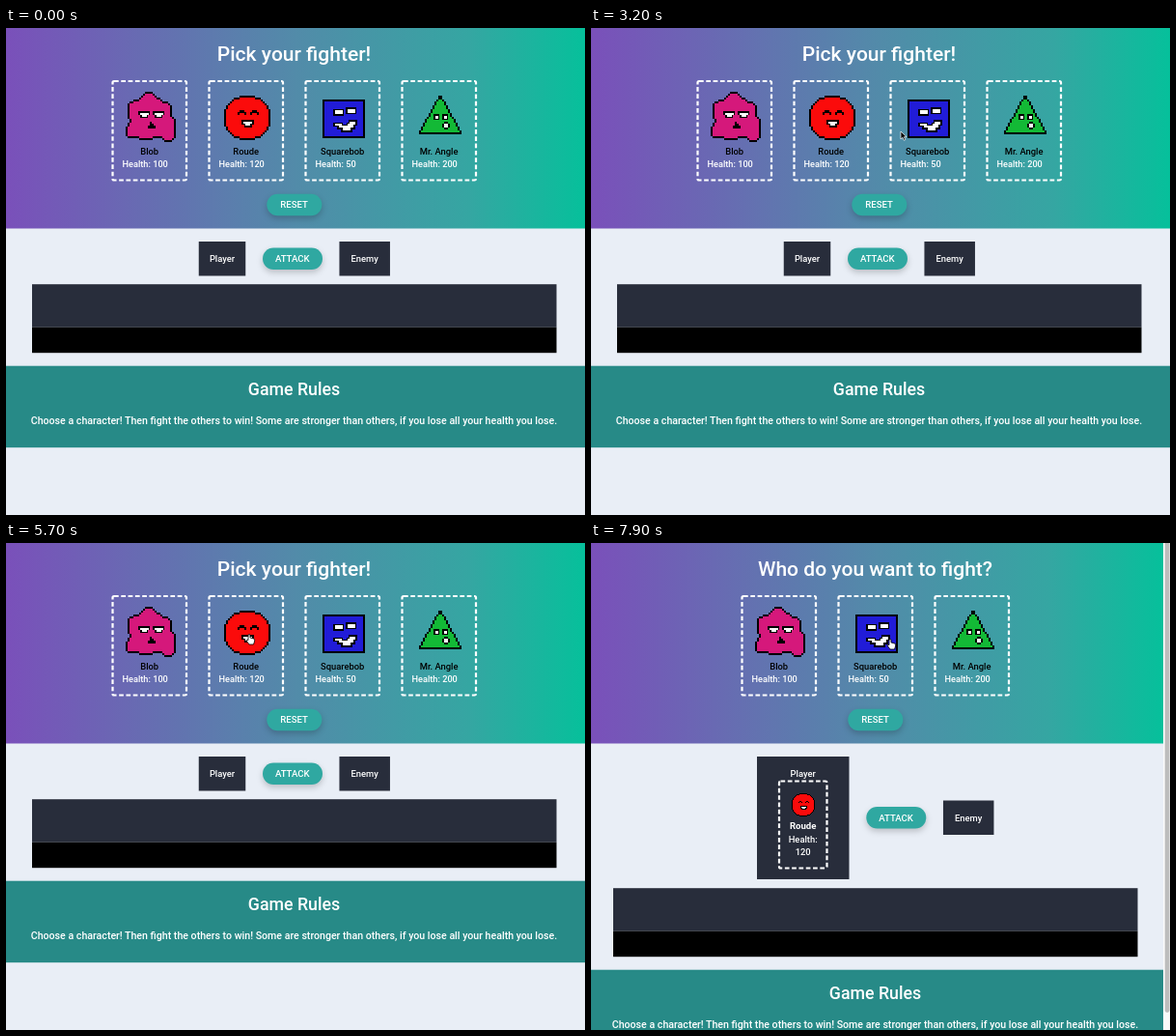
An HTML page for the animation above (8 s loop, 600 by 504 pixels).

```html
<!DOCTYPE html>
<html lang="en">
<head>
<meta charset="utf-8">
<title>Pick your fighter</title>
<style>
html, body { margin: 0; width: 100%; height: 100%; overflow: hidden; background: #e9eef6; }
svg { display: block; width: 600px; height: 504px; }
text { font-family: Roboto, "Liberation Sans", sans-serif; font-weight: 500; fill: #fff; }
.art { shape-rendering: crispEdges; }
.button { filter: drop-shadow(0 3px 3px #0003); }
</style>
</head>
<body>
<svg id="stage" viewBox="0 0 600 504"></svg>
<script>
const LOOP = 8000, SWITCH = 5800, CELL = 2;
const DARK = '#282d3b';

const rect = (x, y, w, h, fill, extra = '') =>
  `<rect x="${x}" y="${y}" width="${w}" height="${h}" fill="${fill}" ${extra}/>`;
const text = (x, y, s, size = 9.4, extra = '') =>
  `<text x="${x}" y="${y}" font-size="${size}" text-anchor="middle" ${extra}>${s}</text>`;
const path = (d, fill, extra = '') => `<path d="${d}" fill="${fill}" ${extra}/>`;

// Shapes are tested on a coarse grid; x is relative to the card centre.
function inPolygon(points) {
  return (x, y) => points.reduce((inside, [ax, ay], i) => {
    const [bx, by] = points[(i + 1) % points.length];
    return (ay > y) !== (by > y) && x < (bx - ax) * (y - ay) / (by - ay) + ax ? !inside : inside;
  }, false);
}

function pixelArt(inside, color, details) {
  let body = '', edge = '';
  for (let y = 66; y < 120; y += CELL) {
    for (let x = -28; x < 28; x += CELL) {
      const hit = (dx, dy) => inside(x + 1 + dx * CELL, y + 1 + dy * CELL);
      if (!hit(0, 0)) continue;
      const cell = `M${x} ${y}h2v2h-2z`;
      if (hit(1, 0) && hit(-1, 0) && hit(0, 1) && hit(0, -1)) body += cell;
      else edge += cell;
    }
  }
  return `<g class="art">${path(body, color)}${path(edge, '#000')}${details}</g>`;
}

const blob = [[-9, 70], [-4, 66], [2, 66], [8, 72], [13, 76], [19, 77], [22, 82], [22, 90],
  [26, 94], [26, 113], [22, 118], [16, 118], [10, 114], [2, 115], [-2, 117], [-8, 117],
  [-12, 115], [-22, 115], [-26, 111], [-26, 103], [-22, 96], [-25, 90], [-24, 79], [-18, 75], [-12, 74]];

const fighters = {
  blob: {
    name: 'Blob', health: 100,
    art: pixelArt(inPolygon(blob), '#d5187b',
      path('M-13 86h12v4h-2v3h-8v-3h-2zM2 86h12v4h-2v3h-8v-3h-2z', '#000') +
      path('M-11 88h9v2h-2v2h-5v-2h-2zM4 88h9v2h-2v2h-5v-2h-2z', '#fff') +
      path('M-1 97h2v2h2v2h2v3h-8v-3h2z', '#000'))
  },
  roude: {
    name: 'Roude', health: 120,
    art: pixelArt((x, y) => (x / 25) ** 2 + ((y - 93) / 23.5) ** 2 < 1, '#fb0b0b',
      path('M-10 87h2v-2h5v2h2v3h-2v-2h-5v2h-2zM3 87h2v-2h5v2h2v3h-2v-2h-5v2h-2z', '#000') +
      path('M-6 95h13v5h-2v3h-8v-3h-3z', '#000') +
      path('M-4 97h9v2h-2v2h-5v-2h-2z', '#fff'))
  },
  square: {
    name: 'Squarebob', health: 50,
    art: pixelArt((x, y) => Math.abs(x) < 22 && y > 74 && y < 114, '#211cd7',
      path('M-11 84h11v7h-11zM2 82h11v7h-11z', '#000') +
      path('M-9 85h8v4h-8zM4 84h8v4h-8z', '#fff') +
      path('M-11 98h10v2h4v-2h2v-3h9v6h-2v4h-3v3h-12v-3h-4v-3h-4z', '#000') +
      path('M-9 99h7v2h6v-2h2v-2h6v3h-2v3h-3v3h-8v-3h-4v-2h-4z', '#fff'))
  },
  angle: {
    name: 'Mr. Angle', health: 200,
    art: pixelArt(inPolygon([[0, 68], [23.5, 110], [-23.5, 110]]), '#13b936',
      path('M-7 89h6v6h-6zM2 89h6v6h-6zM4 97h4v2h2v4h-2v2h-4v-2h-2v-4h2z', '#000') +
      path('M-5 91h3v3h-3zM4 91h3v3h-3zM4 99h4v4h-4z', '#fff'))
  }
};

const dashed = (x, y, w, h) =>
  rect(x, y, w, h, 'none', 'rx="1.5" stroke="#fff" stroke-width="2.2" stroke-dasharray="4.7 2.6"');

const card = ({ name, health, art }, x) =>
  dashed(x - 38.5, 55, 76.5, 102.5) +
  `<g transform="translate(${x + 1})">${art}</g>` +
  text(x - .3, 131, name, 9.4, 'style="fill:#000"') +
  text(x - 28.5, 144.3, `Health: ${health}`, 9.2, 'style="text-anchor:start"');

const button = (x, y, w, label) =>
  rect(x - w / 2, y, w, 22.5, '#2fa8a1', 'rx="11.2" class="button"') +
  text(x - .3, y + 14.7, label, 9.6);

const label = (x, y, w, s) => rect(x - w / 2, y, w, 35.5, DARK) + text(x, y + 21.2, s);

const header = (width, mid, title, cards) =>
  rect(0, 0, width, 207.5, 'url(#sky)') +
  text(mid, 34, title, 21) + cards +
  button(mid + .3, 171.7, 57, 'RESET');

const footer = (width, mid, y) =>
  rect(mid - 271.5, y, 543.5, 44.5, DARK) +
  rect(mid - 271.5, y + 44.5, 543.5, 26.5, '#000') +
  rect(0, y + 84.5, width, 84.5, '#278a87') +
  text(mid, y + 115, 'Game Rules', 17.8) +
  text(mid, y + 145.2, 'Choose a character! Then fight the others to win! Some are stronger than others, ' +
    'if you lose all your health you lose.', 10.62);

const { blob: b, roude: r, square: s, angle: a } = fighters;

const pickScene =
  header(600, 298.5, 'Pick your fighter!', [b, r, s, a].map((f, i) => card(f, 149 + 100 * i)).join('')) +
  label(224, 221, 48.5, 'Player') + button(297, 227.5, 62, 'ATTACK') + label(371.7, 221, 52.5, 'Enemy') +
  footer(600, 298.5, 265.2);

const fightScene =
  header(593, 294.5, 'Who do you want to fight?', [b, s, a].map((f, i) => card(f, 195 + 100 * i)).join('')) +
  rect(172, 221, 95.5, 127, DARK) + text(219.7, 242.2, 'Player') +
  dashed(195, 246.5, 49.5, 90) +
  `<g transform="translate(220 271) scale(.52) translate(0 -93)">${r.art}</g>` +
  text(219.7, 296.3, 'Roude', 9.6, 'style="font-weight:700"') +
  text(219.7, 309.8, 'Health:') + text(219.7, 323, '120') +
  button(316.3, 273, 62, 'ATTACK') + label(391.2, 266.5, 52.5, 'Enemy') +
  footer(593, 294.5, 357.2) +
  rect(593, 0, 7, 504, '#fafafa') + rect(594.7, -5, 4.8, 491, '#bdbdbd', 'rx="2.4"');

const arrow = path('M0 0v8l1.9-1.7 1.4 3 1.5-.7-1.4-2.9h2.6z', '#000', 'stroke="#fff" stroke-width=".7"');
const hand = path('M0 0q1-1 2 0v3l4 1q1 1 .5 3l-1 3h-4.5l-3-4q0-1.500 2-.5z', '#fff', 'stroke="#000" stroke-width=".8"');

const stage = document.getElementById('stage');
stage.innerHTML = `
  <linearGradient id="sky">
    <stop stop-color="#7a50ba"/>
    <stop offset=".5" stop-color="#528ba9"/>
    <stop offset=".8" stop-color="#35a6a2"/>
    <stop offset="1" stop-color="#06c09b"/>
  </linearGradient>
  <g id="pick">${pickScene}</g><g id="fight">${fightScene}</g>
  <g id="cursor"><g id="arrow">${arrow}</g><g id="hand">${hand}</g></g>`;

// Pointer path: time, x, y
const route = [[0, 128, -14], [900, 146, 105], [1400, 190, 140], [1900, 230, 146], [2500, 252, 122],
  [3200, 321, 107], [3700, 334, 105], [4300, 329, 103], [5000, 140, 104], [5700, 251, 95],
  [5800, 253, 95], [6400, 255, 96], [7300, 304, 100], [7900, 309, 100], [8000, 309, 100]];

function pointer(t) {
  const i = Math.max(1, route.findIndex(k => k[0] > t));
  const [t0, x0, y0] = route[i - 1], [t1, x1, y1] = route[i];
  const p = (t - t0) / (t1 - t0), e = p * p * (3 - 2 * p);
  return [x0 + (x1 - x0) * e, y0 + (y1 - y0) * e];
}

const $ = id => document.getElementById(id);
const show = (id, on) => $(id).setAttribute('display', on ? 'inline' : 'none');

function draw(now) {
  const t = Math.floor(now % LOOP / 100) * 100;
  const overImage = t >= 5500 && t < SWITCH || t >= 7000;
  show('pick', t < SWITCH);
  show('fight', t >= SWITCH);
  show('arrow', !overImage);
  show('hand', overImage);
  $('cursor').setAttribute('transform', `translate(${pointer(t)})`);
  requestAnimationFrame(draw);
}
draw(performance.now());
</script>
</body>
</html>
```
